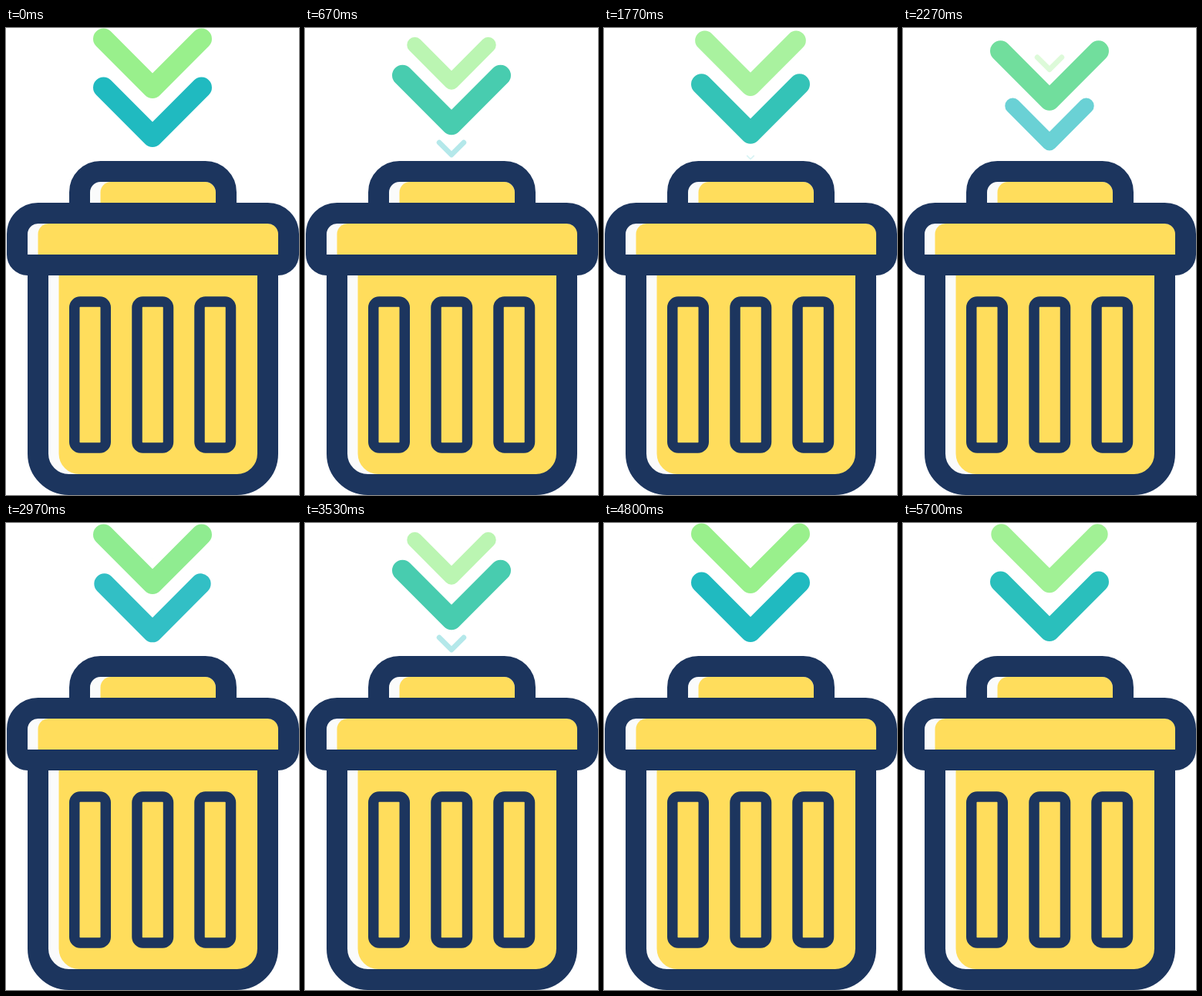
Recreate the animation shown at these times as an HTML page. Size 380 px wide and 604 px high, loop 5.73 s.

```html
<!DOCTYPE html>
<html lang="en">
<head>
<meta charset="utf-8">
<title>Trash can</title>
<style>
  html, body { margin: 0; width: 100%; height: 100%; overflow: hidden; background: #fff; }
  svg { display: block; width: 380px; height: 604px; }
  .line { fill: none; stroke: #1c355e; stroke-width: 27; }
  .slot { fill: none; stroke: #1c355e; stroke-width: 13.5; }
  .shine { fill: #fafbfb; }
  .fill { fill: #ffdd5c; }
  .arrow { fill: none; stroke-width: 27; stroke-linecap: round; stroke-linejoin: round; }
</style>
</head>
<body>
<svg viewBox="0 0 380 604">
  <g>
    <path class="arrow" d="M-63.5-31.75L0 31.75L63.5-31.75"/>
    <path class="arrow" d="M-63.5-31.75L0 31.75L63.5-31.75"/>
    <path class="arrow" d="M-63.5-31.75L0 31.75L63.5-31.75"/>
  </g>

  <!-- handle -->
  <path class="shine" d="M96 232V213a27 27 0 0 1 27-27h20v46z"/>
  <path class="fill" d="M122.500 232V212.500a13.500 13.500 0 0 1 13.500-13.500H258.500a13.500 13.500 0 0 1 13.500 13.500V232z"/>
  <path class="line" d="M95.500 238V212.500a27 27 0 0 1 27-27H258.500a27 27 0 0 1 27 27V238"/>

  <!-- body -->
  <path class="shine" d="M42 310H120V590H81a39 39 0 0 1-39-39z"/>
  <path class="fill" d="M68.500 310H339V551a39 39 0 0 1-39 39H95V577a26.500 26.500 0 0 1-26.500-26.500z"/>
  <path class="line" d="M41.500 308V550.500a40 40 0 0 0 40 40H299.500a40 40 0 0 0 40-40V308"/>

  <!-- lid -->
  <path class="shine" d="M15 300V267a27 27 0 0 1 27-27H80V300z"/>
  <path class="fill" d="M41.500 300V266.500a13.500 13.500 0 0 1 13.500-13.500H340a13.500 13.500 0 0 1 13.500 13.500V300z"/>
  <path class="line" d="M41.500 239.500H339.500a27 27 0 0 1 27 27V293a13.500 13.500 0 0 1-13.500 13.500H28a13.500 13.500 0 0 1-13.500-13.500V266.500a27 27 0 0 1 27-27z"/>

  <rect class="slot" x="88.750" y="354" width="40.500" height="189" rx="7.500"/>
  <rect class="slot" x="170" y="354" width="40.500" height="189" rx="7.500"/>
  <rect class="slot" x="251" y="354" width="40.500" height="189" rx="7.500"/>
</svg>
<script>
  const LOOP = 5730, STEPS = 12, TOP = 45.75, DROP = 63;
  const GREEN = [153, 240, 140], TEAL = [32, 186, 192];
  const [entering, falling, leaving] = document.querySelectorAll('.arrow');

  const ease = p => (1 - Math.cos(Math.PI * p)) / 2;
  const mix = p => `rgb(${GREEN.map((c, i) => Math.round(c + (TEAL[i] - c) * p))})`;

  function place(arrow, y, scale, color, opacity) {
    arrow.setAttribute('transform', `translate(190 ${y}) scale(${scale})`);
    arrow.setAttribute('visibility', scale > 0 ? 'visible' : 'hidden');
    arrow.setAttribute('stroke', color);
    arrow.setAttribute('opacity', opacity);
  }

  // 12.5 poses per second, shown on a 30 Hz grid
  function draw(now) {
    const tick = Math.floor((now % LOOP + 4) * 0.03);
    const p = Math.floor(tick * 5 / 12) % STEPS / STEPS;
    const e = ease(p);
    place(entering, TOP, e, mix(0), p);
    place(falling, TOP + DROP * e, 1, mix(p), 1);
    place(leaving, TOP + DROP * (1 + e), 1 - e, mix(1), 1 - p);
  }

  const start = performance.now();
  function loop() {
    draw(performance.now() - start);
    requestAnimationFrame(loop);
  }
  loop();
</script>
</body>
</html>
```
